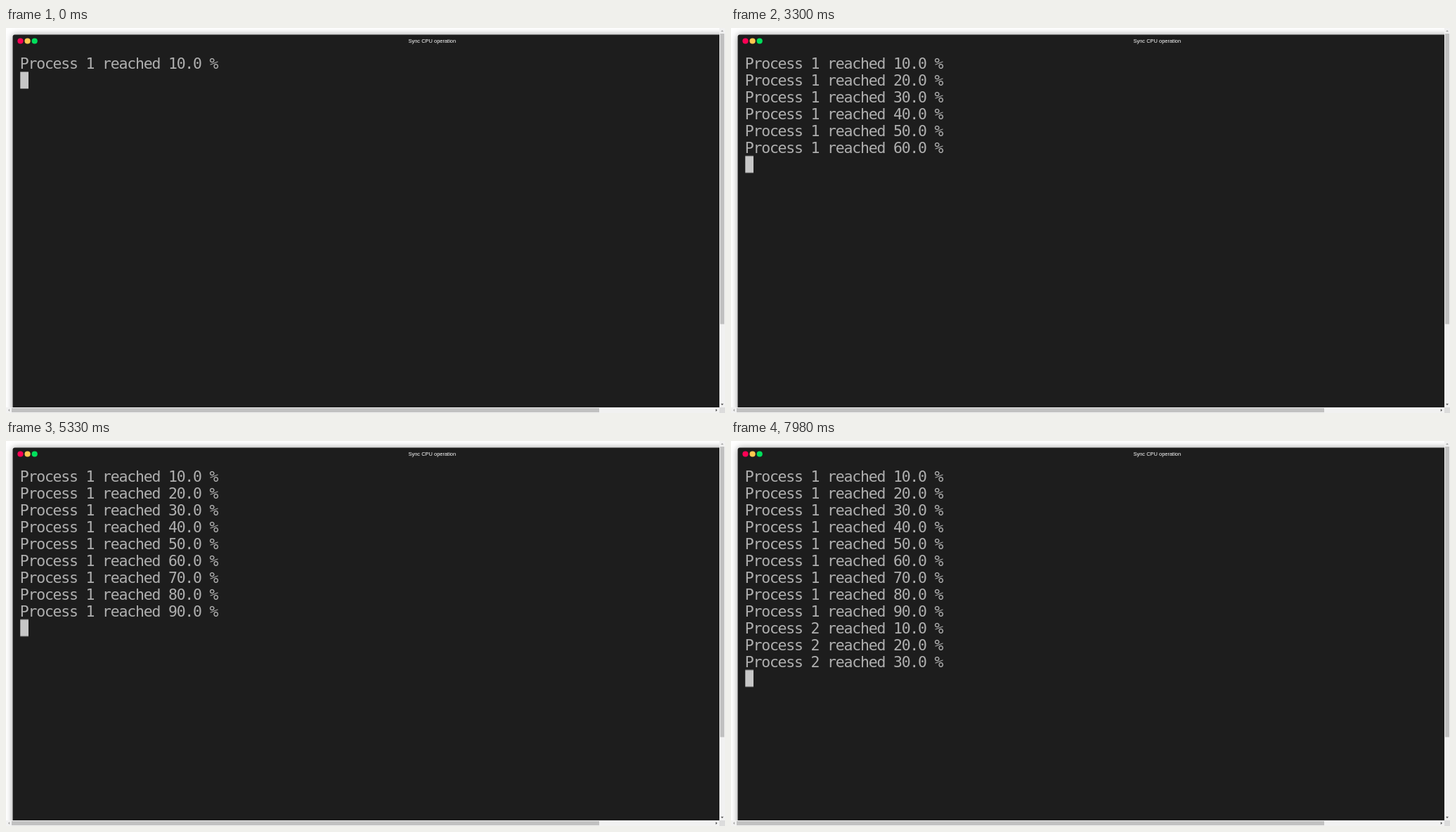
Recreate the animation shown at these times as an HTML page. Size 1023 by 548 pixels, loop 8 s.

```html
<!DOCTYPE html>
<html lang="en">
<head>
<meta charset="utf-8">
<title>Sync CPU operation</title>
<style>
  html, body { margin: 0; width: 100%; height: 100%; overflow: hidden; background: #fff; }
  svg { position: absolute; left: 0; top: 0; overflow: hidden; }
  .window { fill: #1d1d1d; filter: drop-shadow(0 0 5px rgba(0, 0, 0, .4)); }
  .title { font: 7.47px "Liberation Sans", Arial, sans-serif; fill: #fff; text-anchor: middle; }
  .row {
    font: 21.5px "DejaVu Sans Mono", monospace; fill: #afafaf; white-space: pre;
    letter-spacing: calc(11.733px - .602em);
  }
</style>
</head>
<body>
<svg width="1023" height="548" viewBox="0 0 1023 548">
  <rect class="window" x="9.6" y="9.6" width="1040" height="570" rx="3"/>
  <circle cx="20.5" cy="18.5" r="4.1" fill="#ff0055"/>
  <circle cx="30.6" cy="18.5" r="4.1" fill="#ffc84f"/>
  <circle cx="40.7" cy="18.5" r="4.1" fill="#00e05c"/>
  <text class="title" x="606.3" y="21.2">Sync CPU operation</text>

  <g id="rows"></g>
  <rect id="cursor" x="20.27" y="62.4" width="11.73" height="23.95" fill="#c7c7c7"/>

  <g id="scrollbars">
    <path d="M1015 0h8v540h-8zM0 540h1015v8H0z" fill="#f1f1f1"/>
    <path d="M1015 540h8v8h-8z" fill="#dcdcdc"/>
    <path d="M1016 8h6v413.5h-6zM8 541h836v6H8z" fill="#c1c1c1"/>
    <path d="M1017 5.2l2-2.2 2 2.2zM5.2 542l-2.2 2 2.2 2z" fill="#a3a3a3"/>
    <path d="M1017 534.8l2 2.2 2-2.2zM1009.8 542l2.2 2-2.2 2z" fill="#505050"/>
  </g>
</svg>
<script>
  const LOOP = 8000, ROW = 23.95;
  const times = [0, 650, 1300, 1960, 2630, 3300, 3980, 4650, 5330, 6630, 7300, 7980];
  const rows = document.getElementById('rows');
  const cursor = document.getElementById('cursor');
  const timing = { duration: LOOP, iterations: Infinity };
  const step = (time, props) => ({ ...props, offset: time / LOOP, easing: 'step-end' });

  function addRow(i) {
    const el = document.createElementNS('http://www.w3.org/2000/svg', 'text');
    const process = 1 + Math.floor(i / 9), percent = (i % 9 + 1) * 10;
    el.setAttribute('class', 'row');
    el.setAttribute('x', 19.7);
    el.setAttribute('y', 58.3 + i * ROW);
    el.textContent = `Process ${process} reached ${percent}.0 %`;
    rows.append(el);
    return el;
  }

  const animations = times.map((time, i) => {
    const el = addRow(i);
    return time && el.animate(
      [step(0, { opacity: 0 }), step(time, { opacity: 1 }), step(LOOP, { opacity: 1 })], timing);
  }).filter(Boolean);

  const moves = times.map((time, i) => step(time, { transform: `translateY(${i * ROW}px)` }));
  moves.push({ ...moves[moves.length - 1], offset: 1 });
  animations.push(cursor.animate(moves, timing));
  animations.forEach(a => a.startTime = document.timeline.currentTime);
</script>
</body>
</html>
```
